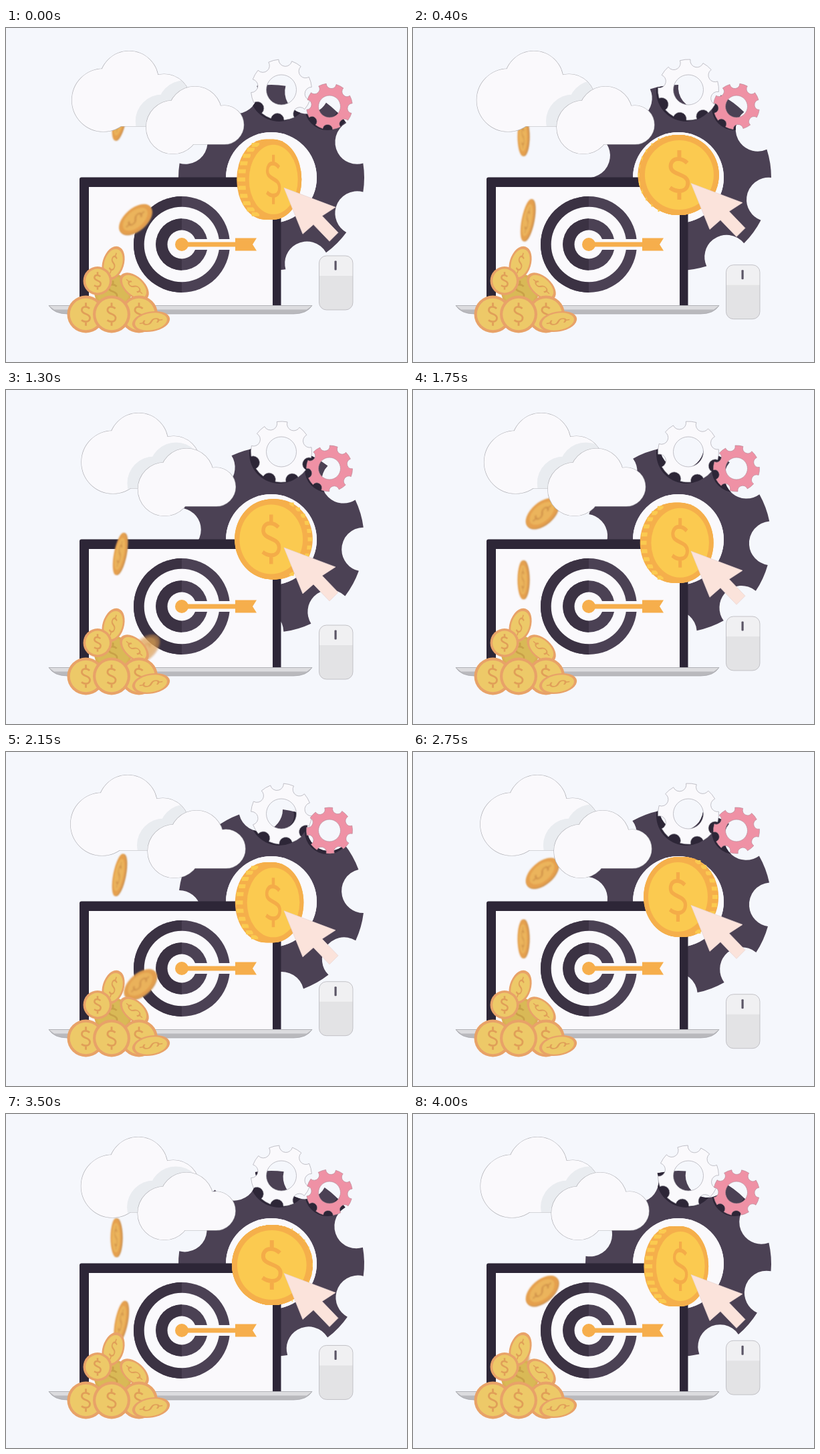
An HTML page with a canvas for the animation above (4050 ms loop, 600 px wide and 500 px high).

```html
<!DOCTYPE html>
<html lang="en">
<head>
<meta charset="utf-8">
<title>Coins, gears and a target</title>
<style>
html, body { margin: 0; width: 100%; height: 100%; overflow: hidden; background: #f5f7fc; }
canvas { display: block; }
</style>
</head>
<body>
<canvas id="stage" width="600" height="500"></canvas>
<script>
const ctx = document.getElementById('stage').getContext('2d');
const LOOP = 4050, STEP = 50, SWING = 2050, DROP = LOOP / 4;
const TAU = Math.PI * 2, RAD = Math.PI / 180;
const WHITE = '#faf9fc', PLUM = '#4b4154', DARK = '#2d2637';
const GOLD = { rim: '#f5af4b', face: '#fbca50', sign: '#f4ac48' };
const PILE = { rim: '#e8a268', face: '#edc968', sign: '#e09f58' };
const BACK = { rim: '#d9b052', face: '#d9b956', sign: '#c9a148' };
const FALL = { rim: '#e5a04e', face: '#ebb45c', sign: '#d0924a' };
const EDGE = { rim: '#cf9655', face: '#cf9655', sign: '#cf9655' };

const swing = (t, peak) => Math.cos(TAU * (t - peak) / SWING);

function paint(path, fill, stroke, width = 0.7) {
  if (fill) { ctx.fillStyle = fill; ctx.fill(path, 'evenodd'); }
  if (stroke) { ctx.strokeStyle = stroke; ctx.lineWidth = width; ctx.stroke(path); }
}

function poly(points, fill, stroke) {
  const p = new Path2D();
  points.forEach(([x, y]) => p.lineTo(x, y));
  p.closePath();
  paint(p, fill, stroke);
}

function oval(x, y, rx, ry, fill) {
  const p = new Path2D();
  p.ellipse(x, y, rx, ry, 0, 0, TAU);
  paint(p, fill);
}

function box(x, y, w, h, r, fill, stroke) {
  const p = new Path2D();
  p.roundRect(x, y, w, h, r);
  paint(p, fill, stroke);
}

// Disc with eight round bites; the first bite lies at the given angle.
function gearPath(cx, cy, R, bite, hole, degrees) {
  const p = new Path2D(), h = 2 * Math.asin(bite / (2 * R)), turn = Math.PI / 2 + h / 2;
  for (let i = 0; i < 8; i++) {
    const a = (degrees + 45 * i) * RAD;
    p.arc(cx + R * Math.cos(a), cy + R * Math.sin(a), bite, a - turn, a + turn, true);
    p.arc(cx, cy, R, a + h, a + 45 * RAD - h);
  }
  p.closePath();
  p.moveTo(cx + hole, cy);
  p.arc(cx, cy, hole, 0, TAU);
  return p;
}

function ringShadow(x, y, R, hole) {
  const p = new Path2D();
  p.arc(x, y, R, 0, TAU);
  p.moveTo(x + hole, y);
  p.arc(x, y, hole, 0, TAU);
  paint(p, DARK);
}

function gears(t) {
  const u = t / LOOP;
  const spin = 360 * u + 5 * Math.sin(Math.PI * u ** 1.4);
  const big = gearPath(397, 224, 139, 33, 68, 22.5 + spin);
  paint(big, PLUM);
  oval(397, 224, 68, 68, WHITE);
  ctx.save();
  ctx.clip(big, 'evenodd');
  ringShadow(409, 95, 45, 22);
  ringShadow(481, 119, 34, 16);
  ctx.restore();
  paint(gearPath(412, 92.5, 45.5, 10, 22.5, -37.5 - spin), WHITE, '#aaa8b0');
  paint(gearPath(484, 117.5, 34.5, 7.5, 16.5, -40.5 + spin), '#ef91a5', '#b98a98');
}

function laptop() {
  box(110, 223.5, 301.5, 196, 3, DARK);
  box(124, 238, 275, 179, 0, WHITE);
  const base = new Path2D('M64 415.5H458Q450 428 430 428H92Q72 428 64 415.5Z');
  paint(base, '#b9b9bd');
  poly([[64, 415.5], [458, 415.5], [450, 421.5], [72, 421.5]], '#dcdcdf');
  paint(base, null, '#a3a2a8');
}

function target() {
  const x = 263, y = 324;
  [[72, 1], [56.3, 0], [38.8, 1], [21.5, 0]].forEach(([r, dark]) => {
    oval(x, y, r, r, dark ? PLUM : WHITE);
    if (!dark) return;
    const half = new Path2D();
    half.arc(x, y, r, Math.PI / 2, -Math.PI / 2);
    paint(half, '#3b3243');
  });
  box(x, y - 8, 74, 16, 0, WHITE);
  oval(x, y, 10, 10, '#f6ae4c');
  box(x, y - 3.5, 84, 7, 0, '#f6ae4c');
  poly([[343, 314.5], [375, 314.5], [369, 324], [375, 333.5], [343, 333.5]], '#f6ae4c');
}

const dollar = new Path2D('M12 -18C7 -23 2 -24 -2 -24C-9 -24 -13 -19 -13 -13'
  + 'C-13 1 13 -3 13 12C13 20 7 24 0 24C-6 24 -10 22 -14 19M0 -37V-24M0 24V37');

// Front of a coin, drawn as a circle of radius 60 squeezed to rx by ry.
function face(x, y, rx, ry, degrees, tone, inner = 52, line = 6) {
  ctx.save();
  ctx.translate(x, y);
  ctx.rotate(degrees * RAD);
  ctx.scale(rx / 60, ry / 60);
  oval(0, 0, 60, 60, tone.rim);
  oval(0, 0, inner, inner, tone.face);
  paint(dollar, null, tone.sign, line);
  ctx.restore();
}

function goldCoin(t, y) {
  const tilt = 46 * RAD * swing(t, 970), s = Math.sin(tilt), rx = 60 * Math.cos(tilt);
  const front = 398 - 3 * s, back = 398 + 15 * s;
  for (let i = 0; i <= 10; i++) oval(back + (front - back) * i / 10, y, rx, 60, GOLD.rim);
  const ridges = new Path2D();
  for (let a = -60; a <= 60; a += 12) {
    const dx = Math.sign(s) * rx * Math.cos(a * RAD), dy = 60 * Math.sin(a * RAD);
    ridges.moveTo(back + dx - 2 * s, y + dy);
    ridges.lineTo(front + dx, y + dy);
  }
  paint(ridges, null, GOLD.face, 6);
  face(front, y, rx, 60, 0, GOLD);
}

function cursor(y) {
  const shape = [[0, 0], [77, 29], [57, 42], [81, 67], [68, 80], [44, 55], [28, 69]];
  poly(shape.map(([dx, dy]) => [416 + dx, y + dy]), '#fbe3db', '#e9d5d1');
}

function mouse(y) {
  box(468.5, y, 50.5, 81, 11, '#e3e3e5');
  box(468.5, y, 50.5, 30, [11, 11, 0, 0], '#f0f0f2');
  box(468.5, y, 50.5, 81, 11, null, '#b0afb5');
  box(491.5, y + 7.5, 3.2, 14, 1, '#5b5566');
}

function faller(x, y, rx, ry, tilt, alpha) {
  if (alpha <= 0) return;
  const a = tilt * RAD;
  ctx.save();
  ctx.globalAlpha = Math.min(1, alpha);
  ctx.filter = 'blur(0.8px)';
  face(x + 2 * Math.cos(a), y + 2 * Math.sin(a), rx, ry, tilt, EDGE);
  face(x, y, rx, ry, tilt, FALL, 46);
  ctx.restore();
}

function fallingCoins(t) {
  const age = start => ((t - start) % DROP + DROP) % DROP;
  const leanY = 115 + 0.377 * age(-58);
  faller(169 + Math.max(0, leanY - 200) * 0.025, leanY, 8.5, 32, 11, (375 - leanY) / 35);
  const thinY = 118 + 0.36 * age(276);
  faller(164.5, thinY, 8, 29, 0, (380 - thinY) / 35);
  const k = age(535) - 190;
  const wideY = Math.min(388, 181 + 0.28 * k + 0.0003 * k * Math.max(0, k));
  faller(193 + Math.max(0, wideY - 283) * 0.12, wideY, 16, 29, 49, (650 - k) / 260);
}

function pile() {
  face(160, 395, 28, 27, 0, BACK);
  face(160.5, 352, 16, 26, 17, PILE, 50);
  face(192, 387, 15, 26, -48, PILE, 50);
  face(137, 378.5, 21.5, 21.5, 0, PILE, 50, 7);
  face(199, 428.5, 28, 28, 0, PILE, 51);
  face(119.5, 428.5, 28, 28, 0, PILE, 51);
  face(158, 428.5, 28, 28, 0, PILE, 51);
  face(217, 439.5, 15, 28.5, 80, PILE, 51);
}

// Each lump is a centre and a radius measured from the cloud's left edge.
const bigLumps = [[47, 108, 47], [85.5, 78.5, 44], [138, 108, 39]];
const smallLumps = [[40, 148.5, 40], [73, 127.5, 40], [117, 145, 29]];

function cloudPath(lumps, dx, dy = 0) {
  const p = new Path2D();
  lumps.forEach(([x, y, r]) => {
    p.moveTo(x + dx + r, y + dy);
    p.arc(x + dx, y + dy, r, 0, TAU);
  });
  return p;
}

function cloud(path) {
  paint(path, null, '#b3b3b8', 1.2);
  ctx.fillStyle = WHITE;
  ctx.fill(path);
}

function clouds(t) {
  const bigX = 104 + 9 * swing(t, 1330), smallX = 206 - 9 * swing(t, 1400);
  const big = cloudPath(bigLumps, bigX), small = cloudPath(smallLumps, smallX);
  big.rect(bigX + 50, 100, 88, 47);
  small.rect(smallX + 50, 140, 68, 34);
  cloud(big);
  ctx.save();
  ctx.clip(big);
  ctx.fillStyle = '#e9ecf0';
  ctx.fill(cloudPath(smallLumps, smallX - 16, -9));
  ctx.restore();
  cloud(small);
}

function draw(t) {
  const bob = 222.8 + 6 * swing(t, 1780);
  ctx.fillStyle = '#f5f7fc';
  ctx.fillRect(0, 0, 600, 500);
  gears(t);
  laptop();
  target();
  goldCoin(t, bob);
  cursor(bob + 12.5);
  mouse(351 + 12.5 * swing(t, 815));
  fallingCoins(t);
  pile();
  clouds(t);
}

function tick() {
  draw(Math.floor(performance.now() % LOOP / STEP) * STEP);
  requestAnimationFrame(tick);
}
tick();
</script>
</body>
</html>
```
